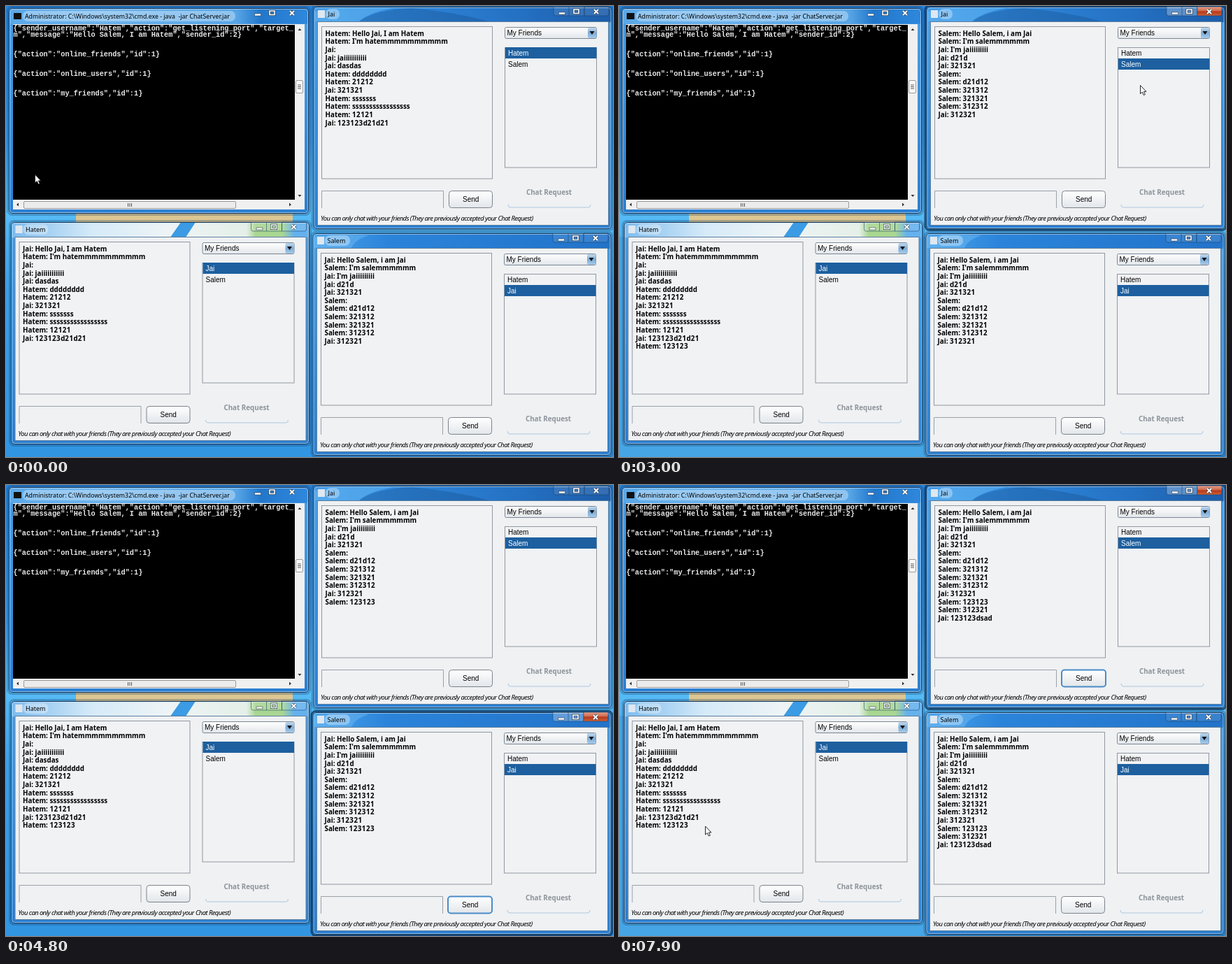
Write an HTML page that moves like this. It is 868 px wide and 645 px high and loops after 8 s.

```html
<!DOCTYPE html>
<html lang="en">
<head>
<meta charset="utf-8">
<title>Chat windows</title>
<style>
html, body { margin: 0; width: 100%; height: 100%; overflow: hidden; background: #3799e5; }
svg { display: block; }
text { white-space: pre; font: 10px "Liberation Sans", sans-serif; }
.chat { font: bold 9.8px "Noto Sans", sans-serif; }
.title { font: 9px "Noto Sans", sans-serif; }
.note { font: italic 9.4px "Noto Sans", sans-serif; letter-spacing: -.56px; }
.console { font: bold 10.28px "Liberation Mono", monospace; fill: #e8e8e8; }
</style>
</head>
<body>
<svg id="stage" width="868" height="645" viewBox="0 0 868 645"></svg>
<script>
const LOOP = 8000, STEP = 100;
const NAMES = { J: 'Jai', H: 'Hatem', S: 'Salem' };
const stage = document.getElementById('stage');

const rect = (x, y, w, h, fill, more = '') =>
  `<rect x="${x}" y="${y}" width="${w}" height="${h}" fill="${fill}" ${more}/>`;
const path = (d, more) => `<path d="${d}" ${more}/>`;
const text = (x, y, s, more = '') => `<text x="${x}" y="${y}" ${more}>${s}</text>`;
const gradient = (id, stops, vertical) =>
  `<linearGradient id="${id}" ${vertical ? 'x2="0" y2="1"' : ''}>` +
  stops.map(([at, color]) => `<stop offset="${at}" stop-color="${color}"/>`).join('') +
  '</linearGradient>';

const defs = '<defs>' +
  gradient('sky', [[0, '#2583da'], [.3, '#3a9ee9'], [.45, '#58bdf6'], [.62, '#3ba0ea'], [1, '#3195e2']], true) +
  gradient('glass', [[0, '#4aa0e6'], [.5, '#3a90de'], [1, '#2a7fd2']], true) +
  gradient('titleC', [[0, '#5aa8e8'], [.3, '#6db3ec'], [.76, '#57a5e6'], [.84, '#2277cb'], [1, '#2f88dc']]) +
  gradient('titleJ', [[0, '#439be8'], [.3, '#2f86da'], [.7, '#2470c2'], [1, '#1d5ca8']]) +
  gradient('titleH', [[0, '#7cbbee'], [.27, '#d5eaf8'], [.53, '#eef4f6'],
    [.79, '#e4efe8'], [.82, '#a9d691'], [.91, '#a9d691'], [.95, '#64b1ee'], [1, '#64b1ee']]) +
  gradient('titleS', [[0, '#4ba3ea'], [.25, '#2b84da'], [1, '#2273c9']]) +
  gradient('red', [[0, '#e3a08a'], [.48, '#cf6547'], [.52, '#b53618'], [1, '#cb6238']], true) +
  gradient('button', [[0, '#ffffff'], [1, '#e2e6ea']], true) +
  gradient('arrow', [[0, '#c3daee'], [.5, '#7eacd6'], [1, '#a6cbea']], true) +
  '</defs>';

// Light and dark reflections in the title bars, in the coordinates of the top right window
const reflections = {
  J: path('M441 22V8Q470 2 500 2H560Q520 8 505 22Z', 'fill="#6cbcf4" fill-opacity=".45"') +
    path('M505 22Q525 6 580 3Q640 8 690 22Z', 'fill="#12427c" fill-opacity=".3"'),
  H: path('M668 22L682 2H703L690 22Z', 'fill="#3b9be4"'),
  S: path('M441 22V6Q480 2 520 4Q500 10 495 22Z', 'fill="#7cc4f6" fill-opacity=".4"')
};

// Title buttons, in the coordinates of the top right window
function controls(active, boxed = true) {
  const box = boxed
    ? path('M783 1V11Q783 14 786 14H827V1M805 1V14',
        `fill="#fff" fill-opacity="${active ? .28 : .1}" stroke="#173e68" stroke-opacity=".55"`) +
      path('M827 1V14H859Q862 14 862 11V1Z',
        `fill="${active ? 'url(#red)' : '#ffffff1a'}" stroke="#173e68" stroke-opacity=".55"`)
    : '';
  return box + rect(790.5, 9, 9, 3, '#fff', 'stroke="#345" stroke-width=".6"') +
    path('M812 5H819V10.5H812Z', 'fill="none" stroke="#345" stroke-width="3"') +
    path('M812 5H819V10.5H812Z', 'fill="none" stroke="#fff" stroke-width="1.6"') +
    path('M841 5L847 11M847 5L841 11', 'stroke="#345" stroke-width="3.2"') +
    path('M841 5L847 11M847 5L841 11', 'stroke="#fff" stroke-width="1.9"');
}

const frame = (x, y, w, h, title, active) =>
  rect(x - 2, y - 2, w + 4, h + 4, 'none', `rx="6" stroke="#08284e" stroke-width="3" stroke-opacity="${active ? .7 : .25}"`) +
  rect(x, y, w, h, 'url(#glass)', 'rx="5"') +
  rect(x, y, w, 22, `url(#${title})`, 'rx="4"') +
  rect(x, y, w, h, 'none', 'rx="5" stroke="#17375a"') +
  rect(x + 1, y + 1, w - 2, h - 2, 'none', 'rx="4" stroke="#d6ecfc" stroke-opacity=".6"');

const glow = (x, y, w) => rect(x, y, w, 15, '#fff', 'rx="7" fill-opacity=".33"');

function consoleWindow() {
  const lines = [
    [35, '{"sender_username":"Hatem","action":"get_listening_port","target_'],
    [44, 'm","message":"Hello Salem, I am Hatem","sender_id":2}'],
    [72, '{"action":"online_friends","id":1}'],
    [100, '{"action":"online_users","id":1}'],
    [128, '{"action":"my_friends","id":1}']];
  const edge = 'stroke="#9a9a9a" rx="1.5"';
  return frame(4.5, 3.5, 428, 293, 'titleC') + glow(24, 7, 304) +
    rect(11, 10, 11, 9, '#111') +
    text(27, 18, 'Administrator: C:\\Windows\\system32\\cmd.exe - java  -jar ChatServer.jar', 'class="title" style="font-size:8.8px"') +
    `<g transform="translate(-435 2)">${controls(false, false)}</g>` +
    rect(10, 26, 417, 265, '#f0f0f0') + rect(10, 27, 403, 250, '#000') +
    lines.map(([y, s]) => text(10.5, y, s, 'class="console"')).join('') +
    rect(414.5, 106.5, 10, 18, '#f8f8f8', edge) +
    path('M417 113H422M417 115.5H422M417 118H422', 'stroke="#555"') +
    rect(25.5, 279.5, 303, 10, '#ececec', edge) +
    path('M174.5 282V287M177 282V287M179.5 282V287', 'stroke="#555"') +
    path('M417.5 35L420 32L422.5 35ZM417.5 270L420 273L422.5 270ZM18 281.5L15 284L18 286.5ZM405 281.5L408 284L405 286.5Z', 'fill="#333"');
}

const withJai = ['H:Hello Jai, I am Hatem', "H:I'm hatemmmmmmmmmm", 'J:', 'J:jaiiiiiiiiiii', 'J:dasdas',
  'H:dddddddd', 'H:21212', 'J:321321', 'H:sssssss', 'H:sssssssssssssssss', 'H:12121', 'J:123123d21d21'];
const withSalem = ['S:Hello Salem, i am Jai', "S:I'm salemmmmmm", "J:I'm jaiiiiiiiii", 'J:d21d', 'J:321321',
  'S:', 'S:d21d12', 'S:321312', 'S:321321', 'S:312312', 'J:312321'];

// The first line always carries the name of the other person
const chatLines = (lines, peer) => lines.map((line, i) => {
  const who = NAMES[i ? line[0] : peer];
  const body = line.slice(2).replace(/\d+/g, '<tspan letter-spacing=".5">$&</tspan>');
  return text(456.5, 42.6 + i * 11.64, `${who}: ${body}`, 'class="chat"');
}).join('');

function chatWindow(id, dx, dy, s) {
  const active = s.active === id;
  const focus = active ? s.focus : '';
  const friends = [...'JHS'].filter(n => n !== id);
  if (id === 'S') friends.reverse();
  const list = friends.map((n, i) => {
    const on = n === s.peer[id], y = 59 + i * 16;
    return (on ? rect(714, y, 130.5, 16, '#1d5f9f') : '') +
      text(718, y + 12, NAMES[n], on ? 'fill="#fff"' : '');
  }).join('');
  const typed = active ? s.typed : '';
  const caret = 455.5 + typed.length * 5.56;
  const field = focus === 'field'
    ? rect(451, 264.5, 175, 24.5, '#f4f6f8', 'stroke="#6f9fcd" stroke-width="2"') +
      path(`M${caret} 270V283`, 'stroke="#000"')
    : path('M451.5 289V264.5H625.5V289', 'fill="none" stroke="#9ba1a8"');
  const send = focus === 'send'
    ? rect(633, 264.5, 63, 24, 'url(#button)', 'rx="4" stroke="#4a8cc8" stroke-width="2"')
    : rect(633.5, 264.5, 62, 24, 'url(#button)', 'rx="4" stroke="#7c838b"');
  const chat = id === 'H' || s.peer[id] === 'H' ? s.withJai : s.withSalem;
  return `<g transform="translate(${dx} ${dy})">` +
    frame(440, 1.5, 426, 317, `title${id}`, active) + reflections[id] +
    glow(457, 4, id === 'J' ? 20 : 36) + rect(446, 6, 10, 11, '#dfe7ef') +
    text(460.5, 15, NAMES[id], 'class="title"') + controls(active) +
    rect(445.5, 22.5, 416, 291, '#eff1f3', 'stroke="#5d7f9f"') +
    rect(451.5, 29.5, 244, 217.5, '#f0f2f4', 'stroke="#9297a0"') + chatLines(chat, s.peer[id]) +
    rect(713.5, 30.5, 131, 16, 'url(#button)', 'rx="2" stroke="#7b8794"') +
    rect(832, 31, 12.5, 15, 'url(#arrow)', 'rx="2"') +
    path('M834.5 36H841.5L838 41Z', 'fill="#111"') + text(716.5, 42, 'My Friends') +
    rect(713.5, 59.5, 131, 171.5, '#f0f2f4', 'stroke="#9297a0"') + list +
    field + text(454.5, 280, typed) + send + text(664.7, 280, 'Send', 'text-anchor="middle"') +
    text(776.5, 270, 'Chat Request', 'class="chat" text-anchor="middle" fill="#8e949a"') +
    path('M718 284Q718 288 721 288H833Q836 288 836 284', 'fill="none" stroke="#adc7e0"') +
    text(450, 307, 'You can only chat with your friends (They are previously accepted your Chat Request)', 'class="note"') +
    '</g>';
}

// Pointer paths: [time, x, y]; it is invisible between paths
const paths = [
  [[0, 41, 241], [600, 118, 562]],
  [[1100, 229, 590], [1300, 229, 590], [1400, 342, 573], [1500, 342, 573], [2200, 669, 525], [2400, 716, 371],
    [2500, 690, 250], [2600, 742, 128], [2700, 773, 87], [2900, 773, 87], [3100, 717, 140], [3400, 560, 520]],
  [[5900, 504, 242], [6000, 507, 255]],
  [[7700, 616, 274], [7900, 123, 488]]];

function pointer(t) {
  const track = paths.find(p => t >= p[0][0] && t <= p.at(-1)[0]);
  if (!track) return '';
  const i = Math.max(1, track.findIndex(k => k[0] >= t));
  const [t0, x0, y0] = track[i - 1], [t1, x1, y1] = track[i];
  const f = (t - t0) / (t1 - t0);
  return `<g transform="translate(${x0 + (x1 - x0) * f} ${y0 + (y1 - y0) * f})">` +
    path('M.5 0V12L3.3 9.6L5.3 14L7.3 13.1L5.4 8.9H9Z', 'fill="#fff" stroke="#111" stroke-width=".9"') + '</g>';
}

// Latest value whose start time has passed
const at = (t, keys) => keys.filter(k => t >= k[0]).at(-1)[1];

// Typed messages: [text, first key, ms per key, sent]
const typing = [['123123', 900, 50, 1400], ['123123', 4100, 100, 4800],
  ['312321', 5100, 100, 5800], ['123123dsad', 6400, 100, 7500]];
const sent = [[4800, 'S:123123'], [5800, 'S:312321'], [7500, 'J:123123dsad']];

function state(t) {
  const job = typing.find(([, from, , to]) => t >= from && t < to);
  return {
    active: at(t, [[0, ''], [800, 'H'], [2900, 'J'], [3500, 'S'], [6300, 'J']]),
    focus: at(t, [[0, ''], [800, 'field'], [1300, 'send'], [2900, ''], [3500, 'field'], [4700, 'send'],
      [5000, 'field'], [5700, 'send'], [6300, 'field'], [7400, 'send']]),
    typed: job ? job[0].slice(0, Math.floor((t - job[1]) / job[2]) + 1) : '',
    peer: { J: t < 2900 ? 'H' : 'S', H: 'J', S: 'J' },
    withJai: t < 1400 ? withJai : [...withJai, 'H:123123'],
    withSalem: withSalem.concat(sent.filter(m => t >= m[0]).map(m => m[1]))
  };
}

function draw(t) {
  const s = state(t);
  stage.innerHTML = defs + rect(0, 0, 868, 645, 'url(#sky)') +
    (s.active === 'J' ? rect(0, 330, 440, 315, '#46a5e4') : '') +
    rect(100, 40, 310, 310, '#dcc793') +
    consoleWindow() + chatWindow('J', 0, 0, s) + chatWindow('H', -432.5, 308, s) +
    chatWindow('S', -1, 324, s) + pointer(t);
}

let shown = -1;
function tick() {
  const t = Math.floor(performance.now() % LOOP / STEP) * STEP;
  if (t !== shown) draw(shown = t);
  requestAnimationFrame(tick);
}
tick();
</script>
</body>
</html>
```
